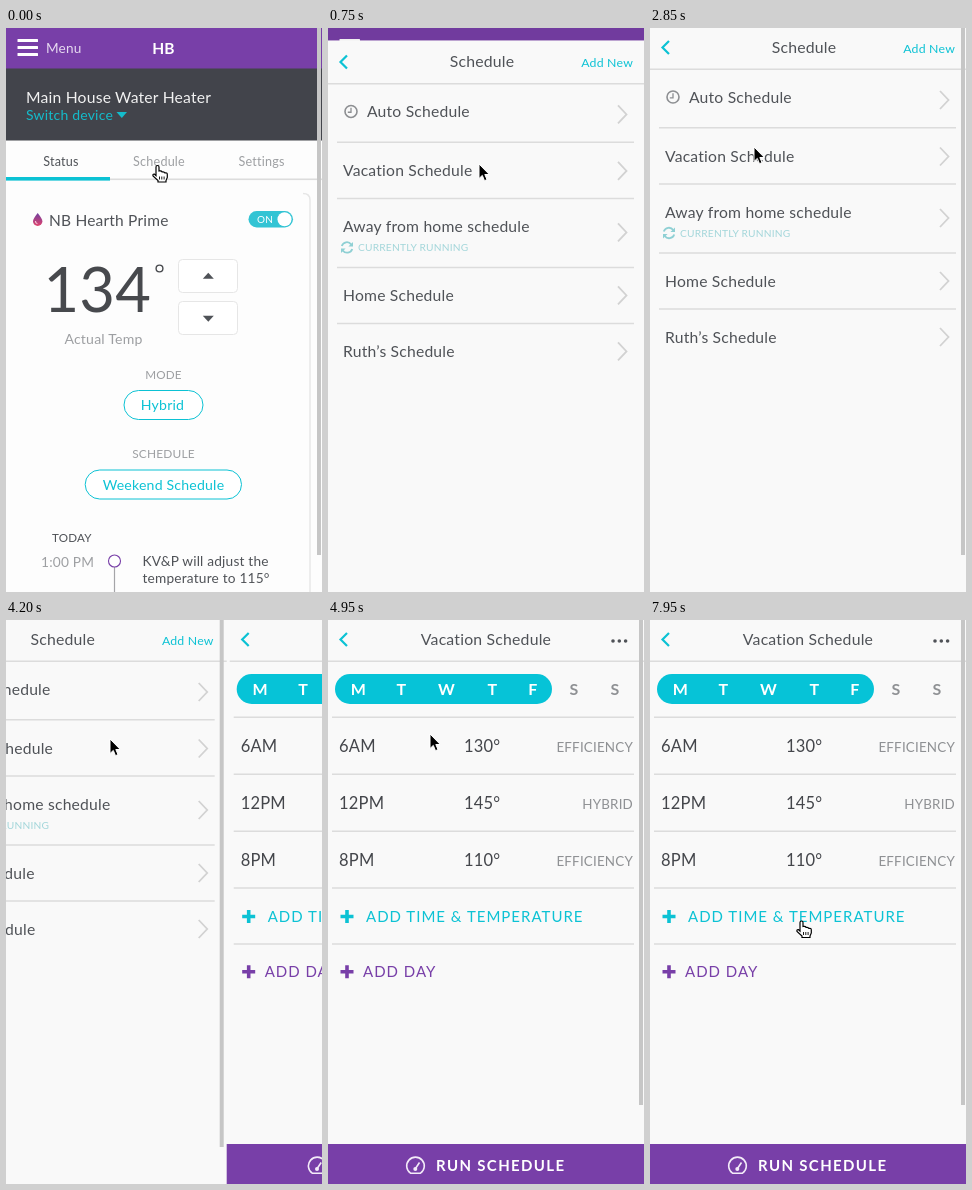
Recreate the animation shown at these times as an HTML page. Size 316x564 px, loop 8000 ms.

```html
<!DOCTYPE html>
<html lang="en">
<head>
<meta charset="utf-8">
<title>Water heater schedule</title>
<style>
  html, body { margin: 0; width: 100%; height: 100%; overflow: hidden; background: #fdfdfd; }
  svg { display: block; width: 100%; height: 100%; font-family: Lato, "Open Sans", sans-serif; letter-spacing: .2px; }
</style>
</head>
<body>
<svg id="stage" viewBox="0 0 316 564"></svg>
<script>
const TEAL = '#0cc2d4', PURPLE = '#783fa8', INK = '#4f5257', GREY = '#9d9fa2', RULE = '#dcdcdc';

// Markup helpers
const text = (x, y, size, fill, str, anchor = 'start', extra = '') =>
  `<text x="${x}" y="${y}" font-size="${size}" fill="${fill}" text-anchor="${anchor}" ${extra}>${str}</text>`;
const centered = (x, y, size, fill, str, extra) => text(x, y, size, fill, str, 'middle', extra);
const rect = (x, y, w, h, fill, r = 0, extra = '') =>
  `<rect x="${x}" y="${y}" width="${w}" height="${h}" fill="${fill}" rx="${r}" ${extra}/>`;
const circle = (x, y, r, fill, extra = '') => `<circle cx="${x}" cy="${y}" r="${r}" fill="${fill}" ${extra}/>`;
const fillPath = (d, fill) => `<path d="${d}" fill="${fill}"/>`;
const line = (d, stroke, width) =>
  `<path d="${d}" fill="none" stroke="${stroke}" stroke-width="${width}"/>`;
const rule = (x, y) => line(`M${x} ${y}H306`, RULE, 1.6);
const scrollbar = (height, id = '') => rect(311, 0, 4, height, '#c6c6c6', 0, id);
const outline = (x, y, w, h, r, stroke) => rect(x, y, w, h, '#fff', r, `stroke="${stroke}"`);
const plus = (x, y, color) => line(`M${x - 6.5} ${y}h13M${x} ${y - 6.5}v13`, color, 3.6);

const navBar = (title, x) =>
  line('M19 13L12.5 19.5L19 26', TEAL, 2.2) + centered(x, 25, 15.8, INK, title) + line('M0 41.3H321', RULE, 1.4);

function homePage() {
  return rect(0, 0, 316, 564, '#fdfdfd')
    + rect(0, 0, 316, 41, PURPLE) + rect(0, 40.5, 316, 72, '#42444b')
    + [11, 18, 25].map(y => rect(11.5, y, 20.5, 3, '#fff', .5)).join('')
    + text(40, 25, 13.6, '#e6daf0', 'Menu')
    + centered(157.5, 26, 15.5, '#fff', 'HB', 'font-weight="700"')
    + text(20, 74.5, 15.7, '#f2f2f2', 'Main House Water Heater')
    + text(20, 92, 14, '#14bccb', 'Switch device') + fillPath('M110.5 84h10.5l-5.2 6z', '#14bccb')
    // tabs
    + centered(55, 137.5, 12.6, INK, 'Status')
    + centered(153, 137.5, 12.6, GREY, 'Schedule')
    + centered(255.5, 137.5, 12.6, GREY, 'Settings')
    + rect(0, 150.5, 316, 1.6, RULE) + rect(0, 149, 104, 3.6, TEAL)
    // device card
    + line('M297 165.5Q304 165.5 304 172V564', '#e6e6e6', 1.4)
    + '<linearGradient id="drop" x2="0" y2="1"><stop stop-color="#6f3f9e"/><stop offset="1" stop-color="#e0436f"/></linearGradient>'
    + fillPath('M31.7 185Q36.4 191 36.4 193.2A4.7 4.7 0 0 1 27 193.2Q27 191 31.7 185Z', 'url(#drop)')
    + line('M29.4 193q0 2.2 2 2.8', '#f6c3d2', 1.2)
    + text(43, 198, 15.5, INK, 'NB Hearth Prime')
    + rect(242.5, 183, 44.5, 16.5, '#33c4d4', 8.2) + text(251, 195, 10, '#fff', 'ON') + circle(278.5, 191.2, 7, '#fff')
    // temperature
    + text(37.5, 284, 61.5, '#47494d', '134') + circle(153.5, 240.5, 3.4, 'none', 'stroke="#47494d" stroke-width="1.4"')
    + centered(97.5, 316, 14.1, GREY, 'Actual Temp')
    + outline(172.5, 231.5, 59, 33, 4, '#e6e6e6') + fillPath('M196.8 250.8h11l-5.5-6z', INK)
    + outline(172.5, 273.5, 59, 33, 4, '#e6e6e6') + fillPath('M196.8 287.8h11l-5.5 6z', INK)
    + centered(157.5, 350.5, 11.7, GREY, 'MODE')
    + outline(118, 362.5, 79, 29, 14.5, TEAL) + centered(156.5, 382, 14.1, TEAL, 'Hybrid')
    + centered(157.5, 429.5, 11.9, GREY, 'SCHEDULE')
    + outline(79.2, 442, 156.3, 29, 14.5, TEAL) + centered(157.5, 462, 14.1, TEAL, 'Weekend Schedule')
    // timeline
    + text(46, 513.5, 11.6, INK, 'TODAY') + text(35, 539, 13.7, GREY, '1:00 PM')
    + line('M108.5 539V564', '#a5a5a8', 1.2) + circle(108.5, 533, 6, '#fff', `stroke="${PURPLE}" stroke-width="1.1"`)
    + text(136.5, 538, 13.7, INK, 'KV&amp;P will adjust the') + text(136.5, 555, 13.7, INK, 'temperature to 115°')
    + scrollbar(527, 'id="homeBar"');
}

function listPage() {
  const rows = [['Vacation', 134], ['Home', 259], ['Ruth’s', 315]];
  return rect(0, -2, 321, 570, '#f9f9f9') + navBar('Schedule', 154)
    + text(305, 25, 12.3, TEAL, 'Add New', 'end')
    + circle(23, 69, 6, 'none', 'stroke="#8d8f92" stroke-width="1.6"') + line('M23 65.3V69.8H19.8', '#8d8f92', 1.3)
    + text(39, 74.5, 15.7, INK, 'Auto Schedule')
    + rows.map(([name, y]) => text(15, y, 15.7, INK, name + ' Schedule')).join('')
    + text(15, 190, 15.7, INK, 'Away from home schedule')
    + line('M13.8 203.5A5.3 5.3 0 0 1 23.2 202M24.2 206.5A5.3 5.3 0 0 1 14.8 208', '#8fd0d4', 1.8)
    + fillPath('M25 199.5v4.5h-4.6zM13 210.5V206h4.6z', '#8fd0d4')
    + text(30, 209, 10.2, '#a3d6da', 'CURRENTLY RUNNING')
    + [72, 128.5, 190, 253, 309].map(y => line(`M290 ${y - 9}L298.5 ${y}L290 ${y + 9}`, '#d2d2d2', 1.8)).join('')
    + [99.8, 156, 225, 281].map(y => rule(9, y)).join('')
    + scrollbar(527, 'id="listBar"');
}

function detailPage() {
  const rows = [['6AM', '130°', 'EFFICIENCY'], ['12PM', '145°', 'HYBRID'], ['8PM', '110°', 'EFFICIENCY']];
  const days = [['M', 30.5], ['T', 73.5], ['W', 118.5], ['T', 164.5], ['F', 205], ['S', 246], ['S', 287]];
  return rect(-3, 0, 324, 564, '#f9f9f9') + navBar('Vacation Schedule', 158)
    + [285, 291.3, 297.6].map(x => circle(x, 21, 1.8, INK)).join('')
    + rect(7, 54, 217, 30, '#06c3d7', 15)
    + days.map(([day, x], i) => centered(x, 75, 16, i < 5 ? '#fff' : '#8f9194', day, 'font-weight="700"')).join('')
    + rows.map(([time, temp, mode], i) => {
        const y = 132 + i * 57;
        return text(11, y, 16.5, '#44464b', time) + text(136, y, 16.5, '#44464b', temp)
          + text(305, y + .3, 13.4, '#8f9194', mode, 'end');
      }).join('')
    + [97.3, 154.3, 211.3, 268, 324].map(y => rule(4, y)).join('')
    + plus(19, 296.5, TEAL) + text(38, 302, 15, TEAL, 'ADD TIME &amp; TEMPERATURE', 'start', 'letter-spacing="1"')
    + plus(19, 351.7, PURPLE) + text(35, 357, 15, PURPLE, 'ADD DAY', 'start', 'letter-spacing="1"')
    + scrollbar(485)
    + rect(-3, 524, 324, 40, PURPLE)
    + line('M82.5 553.2A8.8 8.8 0 1 1 92.5 553.2ZM87.5 548.5L91.5 542.5', '#f3ebf8', 1.6) + circle(87.3, 549, 2, '#f3ebf8')
    + text(108, 551, 15, '#fff', 'RUN SCHEDULE', 'start', 'font-weight="700" letter-spacing="1.35"');
}

const group = (id, body) => `<g id="${id}">${body}</g>`;
document.getElementById('stage').innerHTML =
  group('home', homePage())
  + rect(0, 0, 316, 564, '#000', 0, 'id="shade" opacity=".06"')
  + group('list', listPage()) + group('detail', detailPage())
  + group('cursor',
      '<path id="arrow" d="M0 0V14.5L3.3 11.4L5.5 16.7L8 15.6L5.8 10.5H10.3Z" fill="#000" stroke="#fff"/>'
      + group('hand',
          '<path d="M-2 1.5Q-2 0 -.5 0Q1 0 1 1.5V5.5Q3.5 4.9 4 6.4Q6.4 5.9 6.8 7.4Q9.3 7 9.3 9V12L8 15V16.5H0V15L-5 10.5Q-5.5 8.3 -3.4 8.7L-2 10Z" fill="#fff" stroke="#000" stroke-width="1.2"/>'
          + line('M1.5 11v3M3.8 11v3M6.1 11v3', '#000', .9)));

// Pointer stops: time, x, y, 1 for the hand
const pointer = [
  [0, 152, 137.5, 1], [600, 151, 136, 0],
  [1800, 153, 149, 1], [1950, 154, 185, 1], [2100, 152, 235, 1], [2250, 151, 265, 1],
  [2400, 143, 236, 1], [2550, 120, 160, 1], [2700, 104, 119.5, 1], [2850, 104, 119, 0],
  [4950, 102, 114, 0], [5400, 88, 98, 0], [5550, 71, 68, 0], [5700, 95, 64, 0],
  [5850, 150, 65, 0], [6000, 205, 68, 0], [6150, 232, 72, 0],
  [6450, 232, 125, 0], [6600, 233.5, 204, 0], [6750, 236, 242, 0], [6900, 237, 251, 0],
  [7350, 225, 262, 0], [7500, 198, 281, 1], [7650, 172, 295, 1], [7800, 156, 300, 1], [7950, 152, 301, 1],
];

// cubic-bezier(.1, .7, .1, 1)
function ease(p) {
  if (p <= 0 || p >= 1) return p <= 0 ? 0 : 1;
  const curve = (s, a, b) => 3 * (1 - s) ** 2 * s * a + 3 * (1 - s) * s * s * b + s ** 3;
  let low = 0, high = 1;
  for (let i = 0; i < 24; i++) {
    const mid = (low + high) / 2;
    if (curve(mid, .1, .1) < p) low = mid; else high = mid;
  }
  return curve(low, .7, 1);
}

const LOOP = 8000, TICK = 150, PAGE = 321;
const el = id => document.getElementById(id);
const move = (id, x, y) => el(id).setAttribute('transform', `translate(${x} ${y})`);
const show = (id, on) => el(id).setAttribute('visibility', on ? 'visible' : 'hidden');

function draw(now) {
  const t = Math.floor(now % LOOP / TICK) * TICK;
  const rise = ease((t - 440) / 500), push = ease((t - 4186.8) / 300);
  move('list', -PAGE * push, 566 * (1 - rise));
  move('detail', PAGE * (1 - push) + 3 * (push === 0), 0);
  show('shade', rise > 0);
  show('homeBar', rise === 0);
  show('listBar', t >= 1050);
  const [, x, y, isHand] = pointer.findLast(stop => stop[0] <= t);
  move('cursor', x, y);
  show('hand', isHand);
  show('arrow', !isHand);
}

const start = performance.now();
function loop() {
  draw(performance.now() - start);
  requestAnimationFrame(loop);
}
loop();
</script>
</body>
</html>
```
